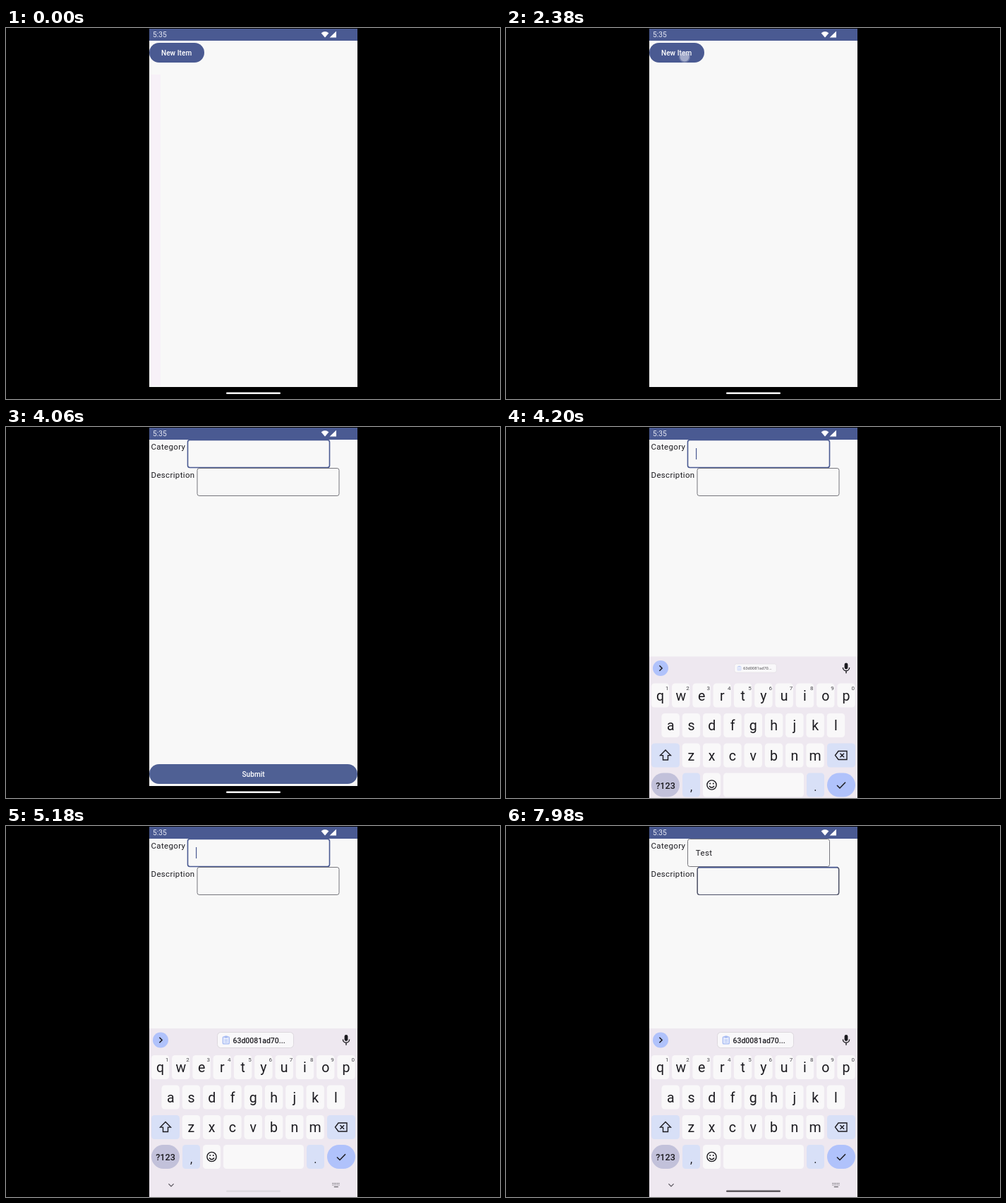
An HTML page with a canvas for the animation above (8 s loop, 700 by 526 pixels).

```html
<!DOCTYPE html>
<html lang="en">
<head>
<meta charset="utf-8">
<title>New item form</title>
<style>
html, body { margin: 0; width: 100%; height: 100%; overflow: hidden; background: #000; }
canvas { display: block; }
</style>
</head>
<body>
<canvas id="stage" width="700" height="526"></canvas>
<script>
const ctx = document.getElementById('stage').getContext('2d');
const LOOP = 8000, STEP = 140;
const BLUE = '#4a5a92', PAPER = '#f8f8f8', INK = '#1c1b20';
const KEY = '#f9f8f9', SOFT = '#d8e0f7', ACCENT = '#b0c2fb';

function box(x, y, w, h, r, fill, stroke, width = 1) {
  ctx.beginPath();
  ctx.roundRect(x, y, w, h, r);
  if (fill) { ctx.fillStyle = fill; ctx.fill(); }
  if (stroke) { ctx.strokeStyle = stroke; ctx.lineWidth = width; ctx.stroke(); }
}

function disc(x, y, r, fill) {
  box(x - r, y - r, 2 * r, 2 * r, r, fill);
}

function text(s, x, y, size, { color = INK, weight = 400, align = 'left', gap = 0 } = {}) {
  ctx.font = `${weight} ${size}px Roboto, sans-serif`;
  ctx.letterSpacing = gap + 'px';
  ctx.textAlign = align;
  ctx.fillStyle = color;
  ctx.fillText(s, x, y);
  return ctx.measureText(s).width;
}

function line(d, width = 1.4, color = INK) {
  ctx.strokeStyle = color;
  ctx.lineWidth = width;
  ctx.stroke(new Path2D(d));
}

function shape(d, color) {
  ctx.fillStyle = color;
  ctx.fill(new Path2D(d));
}

const body = (s, x, y) => text(s, x, y, 11.47, { gap: 0.36 });
const label = (s, x, y) =>
  text(s, x, y, 10.04, { color: '#fff', weight: 500, align: 'center', gap: 0.07 });

function drawFrame() {
  box(0, 0, 700, 526, 0, '#000');
  box(203, 18, 295, 491, 0, PAPER);
  box(203, 1, 295, 17, 0, BLUE);
  text('5:35', 208, 13, 10.2, { color: '#e6e9f5' });
  shape('M446.6 7.2Q452 2.8 457.4 7.2L452 13.6Z', '#fff');
  shape('M458.6 13.6H468V4.4Z', '#fff');
  box(312, 516.4, 77, 2.6, 1.3, '#fff');
}

function drawHome(t) {
  box(203, 18, 295, 491, 0, PAPER);
  if (t < 280) box(204, 66, 15, 441, 0, t < 140 ? '#f7f1f8' : '#f8f5f8');
  box(203, 21, 78, 28, 14, BLUE);
  label('New Item', 241.6, 39);
  if (t >= 2380) {
    disc(253, 41, 8, 'rgba(200,206,226,.3)');
    disc(253, 41, 6.5, 'rgba(205,210,228,.55)');
  }
}

function field(x, y, focused) {
  box(x, y, 201, 39, 2.9, null, focused ? BLUE : '#77777d', focused ? 1.6 : 1);
}

function caret(x, y) {
  box(x, y, 1.2, 16, 0, BLUE);
}

function drawForm(t) {
  box(203, 18, 295, 491, 0, PAPER);
  if (t < 4060) box(204, 19, 76, 30, 13, '#f8f0f8');
  body('Category', 205.5, 31.8);
  body('Description', 205.5, 71.8);

  field(257.5, 18.5, t >= 4060 && t < 7280);
  field(271, 58.5, false);
  if (t >= 7280) {
    box(271.3, 58.6, 200.2, 38.9, 2.9, null, '#4c5068', 1.2);
    line('M273 58.7H470', 1.7, BLUE);
  }

  const typed = 'Test'.slice(0, [5880, 6300, 6580, 6860].filter(at => t >= at).length);
  const width = body(typed, 268.8, 42);
  const blinkOn = (t >= 4200 && t < 4620) || (t >= 5180 && t < 5600) || t >= 5880;
  if (blinkOn && t < 7280) caret(269 + width, 30);
  if (t >= 7420 && t < 7980) caret(282.5, 70);

  box(203, 478, 295, 28, 14, '#4f6094');
  label('Submit', 350.6, 496);
}

function key(x, y, w, fill = KEY, r = 4.5) {
  box(x, y, w, 34, r, fill);
}

function drawKeys() {
  ['qwertyuiop', 'asdfghjkl', 'zxcvbnm'].forEach((row, r) => {
    const y = 325 + 42.5 * r;
    [...row].forEach((c, i) => {
      const x = [218.5, 233.2, 262.4][r] + 29.28 * i;
      key(x - 12.7, y, 25.4);
      text(c, x, y + 24, 19.5, { align: 'center' });
      if (!r) text((i + 1) % 10, x + 9.8, 334, 8, { color: '#45444a', align: 'center' });
    });
  });

  key(206, 410, 40, SOFT);
  line('M226 419.5l7.4 7.6h-3.9v6.4h-7v-6.4h-3.9z');
  key(455, 410, 40, SOFT);
  line('M466.5 427l4.5-6h12v12h-12zM473.5 424.2l5.6 5.6M479.1 424.2l-5.6 5.6');

  key(206, 452, 40, '#c2c1da', 17);
  text('?123', 226, 474, 12.6, { weight: 500, align: 'center' });
  key(250, 452, 25, SOFT);
  text(',', 262.5, 477.5, 16, { align: 'center' });
  key(279, 452, 25);
  box(284.9, 462.4, 13.2, 13.2, 6.6, null, INK, 1.4);
  disc(289.2, 467, 1, INK);
  disc(293.8, 467, 1, INK);
  line('M288 470.5Q291.5 475 295 470.5', 1.4);
  key(308, 452, 114);
  key(426, 452, 25, SOFT);
  text('.', 438.4, 477.5, 16, { align: 'center' });
  key(455, 452, 40, ACCENT, 17);
  line('M469 469.5l4 4 8-8.3', 1.5);
}

function drawChip(scale) {
  ctx.save();
  ctx.translate(353.5, 303.5);
  ctx.scale(scale, scale);
  box(-54, -11, 108, 22, 5, '#f9f8fa', '#dcd8de');
  if (scale < 1) ctx.globalAlpha = 0.6;
  box(-46.2, -4.6, 9, 10, 1.2, '#e6ecfd', '#a6baf2', 1.3);
  box(-44, -6, 4.6, 3, 1, '#a6baf2');
  line('M-44 0h4.6M-44 2.6h4.6', 1, '#a6baf2');
  text('63d0081ad70...', -32, 4, 10.5, { weight: 500 });
  ctx.restore();
}

function drawKeyboard(t) {
  const rising = t < 4340;
  ctx.save();
  ctx.beginPath();
  ctx.rect(203, 18, 295, 508);
  ctx.clip();
  if (rising) ctx.translate(0, 38.5);
  box(203, 287, 295, 240, 0, '#eee8f0');

  disc(219, 303.5, 11, ACCENT);
  line('M217.4 299.8l3.7 3.7-3.7 3.7', 1.5);
  drawChip(rising ? 0.55 : 1);
  box(479.6, 296, 4.8, 9, 2.4, INK);
  line('M477.4 302.5a4.6 4.6 0 0 0 9.2 0M482 307v3.8', 1.4);
  drawKeys();

  line('M230.4 507.3l3.6 3.6 3.6-3.6', 1.2, '#55525a');
  for (let i = 0; i < 10; i++)
    box(462.4 + (i % 5) * 2.2, 506 + (i > 4) * 2.4, 1.2, 1.2, 0, '#66636a');
  box(464.8, 511, 6, 1.2, 0, '#66636a');

  // The gesture bar darkens once the light background is noticed.
  const dark = Math.min(1, Math.max(0, (t - 5320) / 560));
  const shade = 223 - 130 * dark;
  box(312, 516.4, 77, 2.6, 1.3, `rgb(${shade},${shade - 4},${shade + 2})`);
  ctx.restore();
}

function draw(now) {
  const t = Math.floor((now % LOOP) / STEP) * STEP;
  drawFrame();
  if (t < 2660) drawHome(t);
  if (t >= 2520) {
    ctx.globalAlpha = t < 2660 ? 0.5 : 1;
    drawForm(t);
    ctx.globalAlpha = 1;
  }
  if (t >= 4200) drawKeyboard(t);
  requestAnimationFrame(() => draw(performance.now()));
}

draw(performance.now());
</script>
</body>
</html>
```
